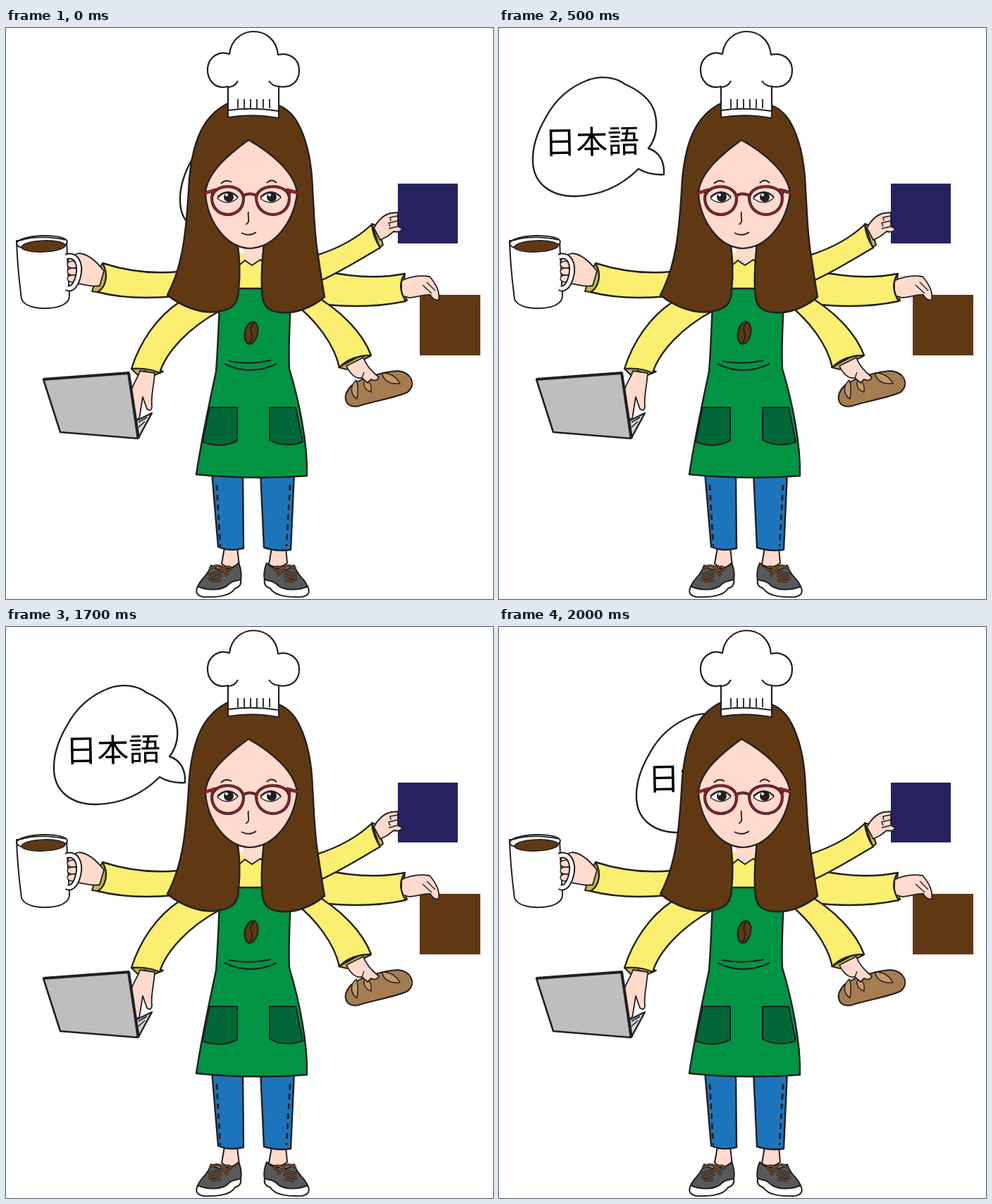
These frames come from a looping animation (691 px wide and 811 px high, 2100 ms). An HTML page with a canvas:

```html
<!DOCTYPE html>
<html lang="en">
<head>
<meta charset="utf-8">
<title>Many-armed baker</title>
<style>
html, body { margin: 0; width: 100%; height: 100%; overflow: hidden; background: #fff; }
canvas { display: block; }
</style>
</head>
<body>
<canvas id="stage" width="691" height="811"></canvas>
<script>
const ctx = document.getElementById('stage').getContext('2d');
const INK = '#231f20', SKIN = '#ffdacd', YELLOW = '#faef70', CUFF = '#c6b93c',
  BROWN = '#603913', GREEN = '#009444', POCKET = '#006838', JEANS = '#1c75bc',
  RED = '#a81e2d', WHITE = '#fff';

function shape(d, fill, width = 2.4, ink = INK) {
  const path = new Path2D(d);
  if (fill) { ctx.fillStyle = fill; ctx.fill(path); }
  if (width) { ctx.lineWidth = width; ctx.strokeStyle = ink; ctx.stroke(path); }
}
const line = (d, width, ink) => shape(d, null, width, ink);

function tube(d, outer, inner, color) {
  line(d, outer);
  line(d, inner, color);
}

function oval(x, y, rx, ry, fill, width = 2.4, turn = 0) {
  ctx.beginPath();
  ctx.ellipse(x, y, rx, ry, turn, 0, Math.PI * 2);
  if (fill) { ctx.fillStyle = fill; ctx.fill(); }
  if (width) { ctx.lineWidth = width; ctx.strokeStyle = INK; ctx.stroke(); }
}

function square(x, y, size, color) {
  ctx.fillStyle = color;
  ctx.fillRect(x, y, size, size);
}

function bubble(dx, dy) {
  ctx.save();
  ctx.translate(dx, dy);
  shape('M212 171C222 158 226 140 221 120C216 103 202 90 179 80C166 70 146 67 126 74C100 84 80 102 67 126C54 148 47 168 48 190C49 220 72 239 108 239C148 238 176 222 198 200C208 206 220 209 234 208C235 190 228 176 212 171Z', WHITE);
  ctx.fillStyle = '#000';
  ctx.font = '500 45px "Noto Sans CJK JP", "Noto Sans CJK", sans-serif';
  ctx.textAlign = 'center';
  ctx.translate(132, 178);
  ctx.rotate(-0.02);
  ctx.fillText('日本語', 0, 0);
  ctx.restore();
}

function mugArm() {
  shape('M137 334L131 345L122 374L136 376L145 352Z', CUFF, 2);
  shape('M139 345C128 331 116 321 104 320L90 324C84 340 88 357 97 363C108 362 118 369 133 366Z', SKIN, 1.8);
  shape('M245 346C205 350 168 344 137 334C146 350 142 368 130 375C160 383 195 385 240 381', YELLOW);
  shape('M15 302C16 340 20 368 22 385C26 395 42 399 60 398C78 397 90 391 90 380L86 304Z', WHITE, 2);
  oval(51, 305, 36, 10, WHITE, 2, -0.04);
  oval(53, 310, 31, 8, BROWN, 1.6, -0.04);
  line('M20 302C35 296 65 296 84 301', 1.6);
  for (const y of [336, 346, 356]) oval(95, y, 8, 5, SKIN, 1.4);
  tube('M85 325C100 320 107 336 102 354C98 368 92 372 86 369', 9, 5, WHITE);
}

function laptopArm() {
  shape('M176 562L207 547L188 582Z', '#d1d3d4', 2.4);
  line('M188 560L200 553M188 567L197 559', 1.6);
  shape('M178 484L187 493L197 487L211 493L223 488L200 480Z', CUFF, 2);
  shape('M190 487C187 498 179 506 177 518L182 553Q189 560 190 549L194 524L200 541Q206 546 207 538C205 524 210 508 211 490Z', SKIN, 1.8);
  shape('M245 390C215 410 190 445 178 484Q201 482 218 490C227 460 260 425 303 402L290 380', YELLOW);
  shape('M53 499L174 490L187 583L77 574Z', '#bcbec0', 2.6);
  line('M53 499L174 490L188 583', 4);
}

function rightArms() {
  square(556, 221, 85, '#262262');
  square(587, 379, 86, BROWN);

  shape('M566 349L556 364L562 386L569 387L564 368Z', CUFF, 2);
  shape('M561 359C575 352 588 351 601 353C608 361 616 374 614 386Q607 388 602 379C592 378 582 383 572 383L561 380Z', SKIN, 1.8);
  line('M591 365L604 377M597 361L609 373', 1.4);
  shape('M450 345C500 356 535 355 566 349Q554 366 567 388C530 396 490 397 446 392', YELLOW);

  shape('M519 278L527 281L535 308L530 312Z', CUFF, 2);
  shape('M522 284C528 273 537 265 546 263L556 262L556 282L562 285Q560 291 550 289L541 296L531 301Z', SKIN, 1.8);
  line('M555 267L545 269L546 274M555 274L543 277L545 282M555 282L543 285', 1.5);
  shape('M440 323C475 312 500 297 519 279Q521 297 531 312C505 327 475 346 446 359', YELLOW);

  shape('M490 508C505 496 538 488 556 487C575 489 583 506 570 517C555 525 520 530 500 537C482 541 475 524 490 508Z', '#a67c52', 2);
  shape('M497 500C488 508 488 520 498 527Q501 511 497 500Z', '#c49a6c', 1.5);
  shape('M511 499C504 505 510 515 518 517Q520 505 511 499Z', '#c49a6c', 1.5);
  shape('M534 490C534 499 544 507 559 505Q551 490 534 490Z', '#c49a6c', 1.5);
  shape('M472 482L484 485L497 476L517 466L507 463Z', CUFF, 2);
  shape('M483 480C488 491 496 499 505 497L513 504L518 499Q526 503 529 496C519 488 511 480 507 468Z', SKIN, 1.8);
  line('M505 497L508 489', 1.4);
  shape('M430 375C478 402 507 435 518 465Q490 465 473 482C466 450 440 415 410 392', YELLOW);
}

function shoe() {
  shape('M291 763C300 773 322 769 330 760C334 768 335 780 332 787L315 800L280 800L272 794C275 782 287 779 291 763Z', '#58595b', 2);
  shape('M272 793C285 799 307 800 316 790C322 784 329 786 333 783Q335 793 325 796C318 808 295 809 280 808C269 806 269 800 272 793Z', WHITE, 2);
  const laces = 'M289 768Q301 759 314 771M287 777L309 770M287 783L306 777M291 786L305 784M305 769C319 760 326 771 309 771L315 778';
  tube(laces, 4, 2, '#754c29');
}

function legs() {
  shape('M310 738L306 761Q318 771 331 764L328 738Z', SKIN, 2);
  shape('M377 738L373 762Q386 770 399 760L397 738Z', SKIN, 2);
  shape('M292 630L301 737Q318 744 337 739L336 630Z', JEANS);
  shape('M361 630L366 738Q385 744 404 741L409 630Z', JEANS);
  ctx.setLineDash([8, 6]);
  line('M299 649L304 736M403 649L398 736', 2.8);
  ctx.setLineDash([]);
  shoe();
  ctx.save();
  ctx.translate(700, 0);
  ctx.scale(-1, 1);
  shoe();
  ctx.restore();
}

function apron() {
  shape('M304 320L304 380L404 380L404 320Z', YELLOW, 0);
  shape('M304 370L404 370C404 410 400 450 402 484C416 530 428 590 427 636Q350 642 270 634C275 600 289 530 298 488C301 450 302 410 304 370Z', GREEN);
  shape('M289 539L328 539L328 586Q306 598 279 588Z', POCKET, 2);
  shape('M374 539L411 539L421 588Q394 597 374 585Z', POCKET, 2);
  line('M316 473Q346 479 376 472M310 477Q346 495 384 477', 2);
  oval(348, 433, 9, 16, BROWN, 2, 0.2);
  line('M352 418C340 430 356 434 345 448', 2);
}

function eye(x) {
  shape(`M${x - 15} 242Q${x} 226 ${x + 14} 241Q${x} 254 ${x - 15} 242Z`, WHITE, 1.2);
  oval(x + 1, 240, 7, 7, INK, 0);
  oval(x - 2, 237, 2, 2, WHITE, 0);
  line(`M${x - 15} 240Q${x} 226 ${x + 14} 240`, 2);
}

function head() {
  shape('M315 107C280 124 265 160 260 215C256 290 251 338 229 379C247 395 280 408 304 402C321 400 330 390 330 372C333 345 331 325 328 300L366 300C364 330 361 355 364 382C366 398 376 403 390 404C410 406 433 398 452 382C449 365 446 345 443 325C437 290 437 255 435 230C434 195 428 165 418 143C411 127 400 115 387 110Z', BROWN);
  shape('M336 306L336 331L349 337L362 330L362 306Z', SKIN, 0);
  line('M332 336L339 330L349 337L361 329L365 333', 2);
  shape('M344 159C318 178 284 205 283 236C286 273 311 312 346 313C381 312 408 276 413 235C410 205 376 177 344 159Z', SKIN, 2.2);
  line('M305 221Q312 214 320 219M370 220Q377 213 384 220', 2);
  line('M344 261C342 268 348 276 340 279M334 291Q345 297 355 290', 1.8);
  eye(315);
  eye(376);
  const frames = 'M292 241C294 220 335 220 337 241C338 273 292 273 292 241ZM355 241C357 220 401 220 402 241C402 273 356 273 355 241ZM337 238Q346 233 355 238';
  tube(frames, 4, 1.8, RED);
  tube('M281 235L296 230L292 237M414 234L399 230L403 237', 4.4, 2.4, RED);
}

function hat() {
  shape('M315 83C296 88 285 73 286 57C288 40 303 32 317 37C319 17 335 5 351 5C369 5 384 17 386 38C402 34 416 44 416 60C416 76 405 86 387 83L387 128Q350 121 315 127Z', WHITE, 2.2);
  line('M314 84Q325 84 329 75M373 75Q378 83 388 83M315 117Q350 112 387 118', 2);
  for (let i = 0; i < 6; i++) line(`M${329 + i * 9} 101v13`, 1.8);
}

// Bubble offset at every 100 ms; it rests from 500 to 1500 ms.
const OUT = [[199, 57], [155, 55], [110, 48], [70, 36], [33, 19], [0, 0]];
const BACK = [[-33, -19], [-2, 0], [20, 13], [42, 25], [95, 43], [147, 53]];

function offsetAt(ms) {
  const step = Math.floor(ms / 100);
  return step < 15 ? OUT[Math.min(step, 5)] : BACK[step - 15];
}

function draw(now) {
  ctx.fillStyle = WHITE;
  ctx.fillRect(0, 0, 691, 811);
  ctx.lineJoin = 'round';
  bubble(...offsetAt(now % 2100));
  mugArm();
  laptopArm();
  rightArms();
  legs();
  apron();
  head();
  hat();
  requestAnimationFrame(draw);
}
requestAnimationFrame(draw);
</script>
</body>
</html>
```
